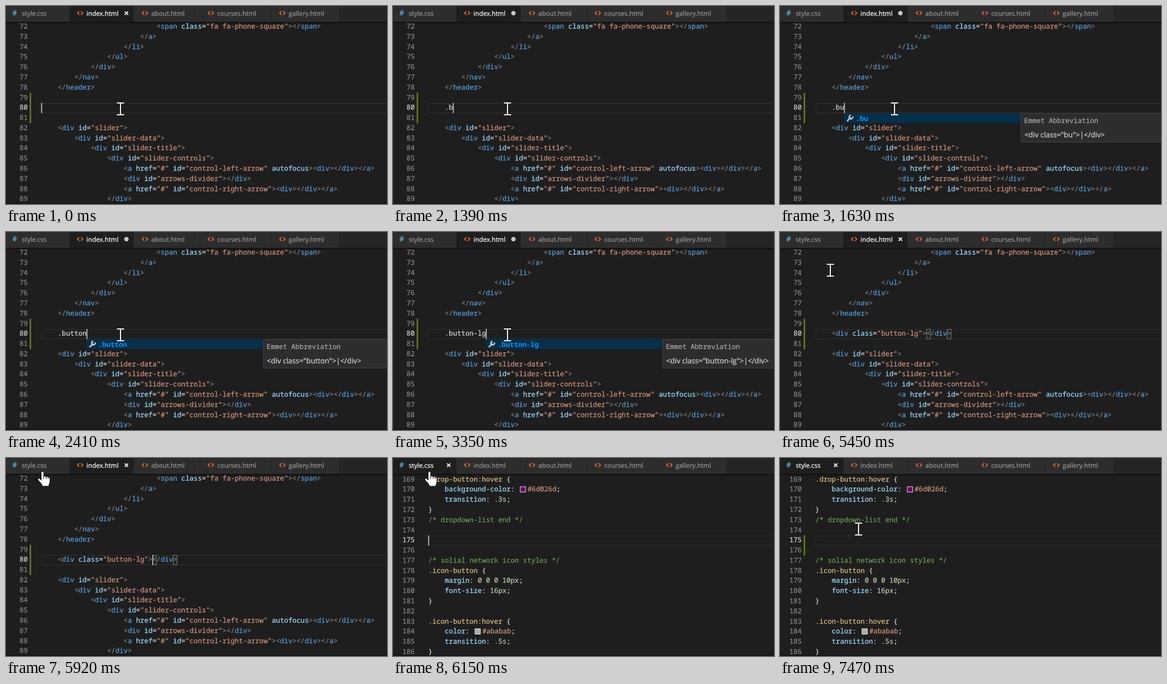
An HTML page for the animation above (8000 ms loop, 742 by 386 pixels).

```html
<!DOCTYPE html>
<html lang="en">
<head>
<meta charset="utf-8">
<title>Emmet in the editor</title>
<style>
  html, body { margin: 0; width: 100%; height: 100%; overflow: hidden; background: #1e1e1e; }
  svg { display: block; }
  text { white-space: pre; text-rendering: geometricPrecision; }
  text, tspan { fill: currentColor; stroke: currentColor; stroke-width: .28px; }
  .code { font: 13.36px "Noto Sans Mono", "DejaVu Sans Mono", monospace; color: #d4d4d4; }
  .ui { font: 12.6px "Open Sans", "Noto Sans", sans-serif; color: #d4d4d4; }
  .num { color: #858585; text-anchor: end; }
  .now { color: #d0d0d0; }
  .br { color: #808080; }
  .tag { color: #569cd6; }
  .att { color: #9cdcfe; }
  .str { color: #ce9178; }
  .sel { color: #d7ba7d; }
  .val { color: #b5cea8; }
  .com { color: #6a9955; }
  .tab rect { fill: #2d2d2d; }
  .tab text { color: #969696; }
  .tab.on rect { fill: #1e1e1e; }
  .tab.on text { color: #fff; }
  .tab .hash, .tab.on .hash { color: #519aba; font-weight: 700; font-size: 13.5px; }
  .tab .angle { fill: none; stroke: #d9652f; stroke-width: 2; }
  .tab .close { stroke: #f0f0f0; stroke-width: 2.1; visibility: hidden; }
  .tab .dot { fill: #c5c5c5; visibility: hidden; }
  .tab.on:not(.dirty) .close, .tab.on.dirty .dot { visibility: visible; }
  .line { fill: none; stroke: #292929; stroke-width: 2; }
  .match { fill: rgba(0, 100, 0, .1); stroke: #888; }
  .label { color: #0097fb; font-weight: 700; stroke-width: 0; }
  .hint { color: #a8a8a8; }
  .preview { font-size: 14.2px; }
</style>
</head>
<body>
<svg width="742" height="386" viewBox="0 0 742 386">
  <defs>
    <linearGradient id="shade" x2="0" y2="1">
      <stop stop-color="#000" stop-opacity=".55"/>
      <stop offset="1" stop-color="#000" stop-opacity="0"/>
    </linearGradient>
  </defs>
  <rect width="742" height="386" fill="#1e1e1e"/>
  <g id="page"></g>
  <g id="sheet"></g>
  <rect id="caret" width="1.8" height="20" fill="#c4c5c3"/>
  <rect y="31" width="742" height="4" fill="url(#shade)"/>
  <rect y="384" width="742" height="2" fill="#161618"/>
  <rect width="742" height="31" fill="#252526"/>
  <g id="tabs"></g>
  <g id="popup">
    <rect y="209" width="344" height="19" fill="#062f4a"/>
    <path d="M6.5 223.5l5.5-5.5" stroke="#c5c5c5" stroke-width="3" stroke-linecap="round"/>
    <path d="M16.6 215.2a3.6 3.6 0 1 1-3.4-2.3" fill="none" stroke="#c5c5c5" stroke-width="2.6"/>
    <text class="code label" x="22.5" y="223.5"></text>
    <rect x="344.5" y="209.5" width="430" height="56" fill="#2d2d30" stroke="#454545"/>
    <text class="code hint" x="350.5" y="228">Emmet Abbreviation</text>
    <text class="ui preview" x="351" y="256"></text>
  </g>
  <g id="mouse">
    <path id="beam" d="M-7-11H7M0-11V12M-7 12H7" fill="none" stroke="#fff" stroke-width="2"/>
    <g id="hand">
      <path d="M-2.5 1.5a2.5 2.5 0 0 1 5 0V9c1-1.3 4.2-1 4.5.8 1-1 3.6-.6 4 1 1-.8 3.6-.4 3.6 2.2V19c0 3-2 5-2 6.5V28H-.5V26C-2.5 22-7 18-8.6 15.5c-1-2 1.4-3.6 3-2.2L-2.5 16z" fill="#fff" stroke="#000"/>
      <path d="M2.5 9v5M7 10v4M11 11v3" stroke="#000"/>
    </g>
  </g>
</svg>
<script>
const LOOP = 8000, LEFT = 68.8, CHAR = 8.016, PITCH = 19.78, BASE = 13.4;
const PAGE_TOP = 30.7, SHEET_TOP = 32.2;
const SAVE = 4980, EXPAND = 3510, MATCH = 3740, SWITCH = 6070, DIFF = 6310;
const $ = id => document.getElementById(id);
const esc = s => s.replace(/&/g, '&amp;').replace(/</g, '&lt;').replace(/>/g, '&gt;');
const span = (cls, s, extra = '') => `<tspan class="${cls}"${extra}>${esc(s)}</tspan>`;
const colX = col => LEFT + col * CHAR;

// Syntax colouring
function paintHtml(s) {
  if (!s.includes('<')) return esc(s);
  return s.replace(/(<\/?)(\w+)|(>)|("[^"]*")|([\w-]+)/g, (m, open, tag, close, str, att) =>
    open ? span('br', open) + span('tag', tag) : close ? span('br', close)
      : str ? span('str', str) : span('att', att));
}
function paintCss(s) {
  if (s.startsWith('/*')) return span('com', s);
  if (s.endsWith('{')) return span('sel', s.slice(0, -1)) + '{';
  const [prop, value] = s.split(/: /);
  if (!value) return s;
  return span('att', prop) + ': ' + value.replace(/(#\w+)|([\w.]+)/g, (m, hex) =>
    hex ? span('str', hex, ' dx="17"') : span('val', m));
}

function row(top, i, indent, body, number, current) {
  const y = top + i * PITCH + BASE;
  return `<text class="code num${current ? ' now' : ''}" x="42.3" y="${y}">${number}</text>` +
    `<text class="code" x="${colX(indent * 4)}" y="${y}">${body}</text>`;
}
const frame = (top, i) =>
  `<rect class="line" x="69.5" y="${top + i * PITCH + 1}" width="700" height="18.4"/>`;
const gutter = (top, i, n, fill, id) =>
  `<rect id="${id}" x="46" y="${top + i * PITCH}" width="3" height="${n * PITCH}" fill="${fill}"/>`;
const split = s => [s.match(/^\t*/)[0].length, s.trim()];

const page = [
  '\t\t\t\t\t\t\t<span class="fa fa-phone-square"></span>',
  '\t\t\t\t\t\t</a>', '\t\t\t\t\t</li>', '\t\t\t\t</ul>', '\t\t\t</div>', '\t\t</nav>', '\t</header>',
  '', '', '',
  '\t<div id="slider">', '\t\t<div id="slider-data">', '\t\t\t<div id="slider-title">',
  '\t\t\t\t<div id="slider-controls">',
  '\t\t\t\t\t<a href="#" id="control-left-arrow" autofocus><div></div></a>',
  '\t\t\t\t\t<div id="arrows-divider"></div>',
  '\t\t\t\t\t<a href="#" id="control-right-arrow"><div></div></a>',
  '\t\t\t\t</div>'
];
const sheet = [
  '.drop-button:hover {', '\tbackground-color: #6d026d;', '\ttransition: .3s;', '}',
  '/* dropdown-list end */', '', '', '',
  '/* solial network icon styles */', '.icon-button {', '\tmargin: 0 0 0 10px;',
  '\tfont-size: 16px;', '}', '', '.icon-button:hover {', '\tcolor: #ababab;',
  '\ttransition: .5s;', '}'
];

const PAGE_Y = PAGE_TOP + 8 * PITCH, SHEET_Y = SHEET_TOP + 6 * PITCH;
const box = col => `<rect class="match" x="${colX(col) + .3}" y="${PAGE_Y + .8}" width="7.5" height="18.6"/>`;
$('page').innerHTML = frame(PAGE_TOP, 8) + gutter(PAGE_TOP, 7, 3, '#67711f', 'edited') +
  `<g id="match">${box(27)}${box(32)}</g>` +
  page.map((s, i) => {
    const [indent, code] = split(s);
    return row(PAGE_TOP, i, indent, paintHtml(code), 72 + i, i === 8);
  }).join('') +
  `<text id="typed" class="code" x="${colX(4)}" y="${PAGE_Y + BASE}"></text>`;

$('sheet').innerHTML = frame(SHEET_TOP, 6) + gutter(SHEET_TOP, 6, 2, '#587c0c', 'added') +
  sheet.map((s, i) => {
    const [indent, code] = split(s);
    const hex = code.match(/#\w+/);
    const swatch = hex ? `<rect x="${colX(indent * 4 + hex.index) + 2.7}" y="${SHEET_TOP + i * PITCH + 4}"
      width="10.5" height="10.5" fill="${hex[0]}" stroke="#eee"/>` : '';
    return row(SHEET_TOP, i, indent, paintCss(code), 169 + i, i === 6) + swatch;
  }).join('');

// Tabs: name, left edge, width, text x, close x
const tabs = [
  ['style.css', 0, 123, 30.7, 108.5], ['index.html', 124, 124, 156.8, 234.5], ['about.html', 249, 128, 283, 364],
  ['courses.html', 378, 138, 411.3, 502], ['gallery.html', 517, 132, 550.6, 636]
];
$('tabs').innerHTML = tabs.map(([name, x, w, tx, cx], i) => `<g class="tab">
  <rect x="${x}" width="${w}" height="31"/>
  ${i ? `<path class="angle" d="M${tx - 14} 10.2l-3.6 3.6 3.6 3.6m3.2-7.2l3.6 3.6-3.6 3.6"/>`
      : '<text class="ui hash" x="12.5" y="18.4">#</text>'}
  <text class="ui" x="${tx}" y="18.6">${name}</text>
  <path class="close" d="M${cx - 3.3} 10.7l6.6 6.6m0-6.6l-6.6 6.6"/>
  <circle class="dot" cx="${cx}" cy="14" r="4.4"/></g>`).join('');
const tabEls = $('tabs').children;
const [label, , preview] = $('popup').querySelectorAll('text');

// Typing: moment of each key after the tab key
const WORD = '.button-lg';
const keys = [1160, 1390, 1550, 1790, 1950, 2100, 2180, 2640, 2950, 3280];
const LAG = 70;
const typedAt = t => WORD.slice(0, keys.filter(k => t >= k).length);

const caretOff = [[240, 700], [4060, 4520], [5020, 5520], [6550, 7010], [7470, LOOP]];

// Pointer: time, x, y
const path = [[4980, 223, 200], [5448, 98, 74], [5740, 71, 27], [6150, 71, 27], [6540, 153, 138]];
const STEP = 78;
function pointer(t) {
  t = path[0][0] + Math.floor((t - path[0][0]) / STEP) * STEP;
  if (t <= path[0][0]) return path[0].slice(1);
  const i = path.findIndex(p => p[0] > t);
  if (i < 0) return path[path.length - 1].slice(1);
  const [a, b] = [path[i - 1], path[i]];
  const k = (t - a[0]) / (b[0] - a[0]), e = k * k * (3 - 2 * k);
  return [a[1] + (b[1] - a[1]) * e, a[2] + (b[2] - a[2]) * e];
}

const show = (el, on) => el.setAttribute('visibility', on ? 'visible' : 'hidden');
const move = (el, x, y) => el.setAttribute('transform', `translate(${x} ${y})`);
let lastLine = null;

function draw(t) {
  const onSheet = t >= SWITCH, expanded = t >= EXPAND;
  $('page').style.display = onSheet ? 'none' : '';
  $('sheet').style.display = onSheet ? '' : 'none';
  tabEls[0].classList.toggle('on', onSheet);
  tabEls[1].classList.toggle('on', !onSheet);
  tabEls[1].classList.toggle('dirty', t >= 850 && t < SAVE);
  show($('added'), t >= DIFF);
  show($('match'), t >= MATCH && !onSheet);

  const word = typedAt(t);
  const line = expanded ? `<div class="${WORD.slice(1)}"></div>` : word;
  if (line !== lastLine) $('typed').innerHTML = paintHtml(lastLine = line);

  const col = onSheet || t < 850 ? 0 : expanded ? 27 : 4 + word.length;
  move($('caret'), colX(col) - .3, onSheet ? SHEET_Y : PAGE_Y);
  show($('caret'), !caretOff.some(([a, b]) => t >= a && t < b));

  const hint = typedAt(t - LAG);
  const open = hint.length > 1 && t < EXPAND + LAG;
  show($('popup'), open);
  if (open) {
    move($('popup'), Math.round(colX(4 + hint.length)), 0);
    label.textContent = hint;
    preview.textContent = `<div class="${hint.slice(1)}">|</div>`;
  }

  const [x, y] = pointer(t), overTab = y < 31;
  move($('mouse'), x, y);
  show($('hand'), overTab);
  show($('beam'), !overTab);
}

const start = performance.now();
function tick() {
  draw((performance.now() - start) % LOOP);
  requestAnimationFrame(tick);
}
tick();
</script>
</body>
</html>
```
